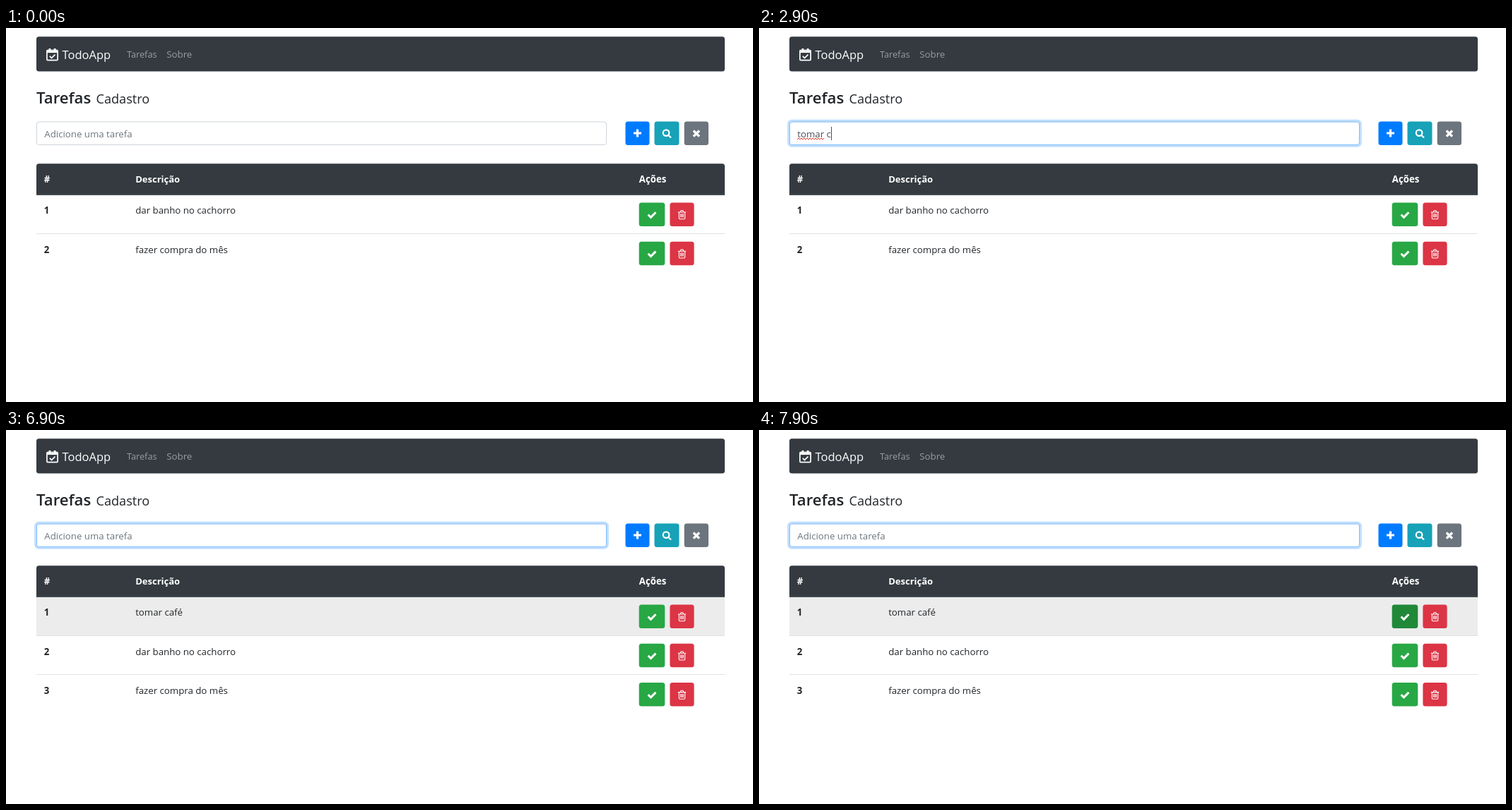
Write an HTML page that moves like this. It is 1057 px wide and 530 px high and loops after 8 s.

```html
<!DOCTYPE html>
<html lang="pt">
<head>
<meta charset="utf-8">
<title>Tarefas</title>
<style>
  html, body { margin: 0; width: 100%; height: 100%; overflow: hidden; background: #fff; }
  svg { display: block; width: 1057px; height: 530px; font: 13.25px "Open Sans", sans-serif; fill: #212529; }
  .bold { font-weight: 700; }
  .white { fill: #fff; }
  .muted { fill: rgba(255, 255, 255, .5); }
  .line { fill: none; stroke: #fff; }
  #typed { fill: #495057; white-space: pre; }
  .wave { fill: none; stroke: #e3362c; stroke-width: 1; }
</style>
</head>
<body>
<svg viewBox="0 0 1057 530">
  <defs>
    <g id="check"><path class="line" stroke-width="3" d="M-5.4 .2l3.8 3.8 7-7"/></g>
    <g id="trash" class="line" stroke-width="1.1">
      <path d="M-5.6 -3.7h11.2M-2.2 -4l.8-2h2.8l.8 2M-4.2 -3.5v8.3q0 1.2 1.1 1.2h6.2q1.1 0 1.1-1.2v-8.3M-1.9 -1.4v5M0 -1.4v5M1.9 -1.4v5"/>
    </g>
  </defs>

  <rect x="43" y="12.3" width="974" height="49.2" rx="3.5" fill="#343a40"/>
  <g class="line" stroke-width="1.7">
    <rect x="57.9" y="31.6" width="15.2" height="14" rx="1"/>
    <path d="M58 33.8h15" stroke-width="2.6"/>
    <path d="M61.9 29v4.4M69.1 29v4.4" stroke-width="2.8"/>
    <path d="M61.8 39.9l2.7 2.7 5-5"/>
  </g>
  <text class="white" x="79.5" y="44" font-size="16.5">TodoApp</text>
  <text class="muted" x="171" y="42" font-size="12.7">Tarefas</text>
  <text class="muted" x="227.3" y="42">Sobre</text>

  <text x="43" y="107" font-size="22.2" font-weight="600">Tarefas</text>
  <text x="127.5" y="107" font-size="18.1">Cadastro</text>

  <rect id="glow" x="41.6" y="131.1" width="809.8" height="36.3" rx="4.8" fill="none" stroke="#007bff" stroke-opacity=".25" stroke-width="2.8"/>
  <rect x="43.5" y="133" width="806" height="32.5" rx="3" fill="#fff" stroke="#ced4da"/>
  <rect id="edge" x="43.5" y="133" width="806" height="32.5" rx="3" fill="none" stroke="#80bdff"/>
  <text id="hint" x="54.3" y="155" fill="#6c757d">Adicione uma tarefa</text>
  <text id="typed" x="54.3" y="155"></text>
  <path id="wave1" class="wave"/>
  <path id="wave2" class="wave"/>
  <rect id="caret" y="140" width="1" height="19" fill="#495057"/>

  <rect x="876.5" y="132.5" width="34" height="33.4" rx="3.5" fill="#007bff"/>
  <path class="line" stroke-width="3.2" d="M888 149h11M893.5 143.5v11"/>
  <rect x="917.5" y="132.5" width="35" height="33.4" rx="3.5" fill="#17a2b8"/>
  <path class="line" stroke-width="2.2" d="M938.4 148.6a4.3 4.3 0 1 0-8.6 0a4.3 4.3 0 1 0 8.6 0M937.2 151.7l3.8 3.8"/>
  <rect x="959.7" y="132.5" width="34.3" height="33.4" rx="3.5" fill="#6c757d"/>
  <path class="line" stroke-width="3.3" d="M972.8 145.5l8.2 8.2M981 145.5l-8.2 8.2"/>

  <path d="M43 237v-41.3q0-3.5 3.5-3.5h967q3.5 0 3.5 3.5v41.3z" fill="#343a40"/>
  <rect x="43" y="235.5" width="974" height="1.5" fill="#454d55"/>
  <g class="white bold">
    <text x="53.8" y="219.3">#</text>
    <text x="183.2" y="219.3" font-size="13">Descrição</text>
    <text x="895.8" y="219.3">Ações</text>
  </g>
  <g id="rows"></g>
</svg>
<script>
const LOOP = 8000, PITCH = 55.3, LEFT = 54;
const PHRASE = 'tomar café';
const OLD_TASKS = ['dar banho no cachorro', 'fazer compra do mês'];
const NEW_TASKS = [PHRASE, ...OLD_TASKS];
const ADDED = 5400;
const KEYS = [1800, 1900, 2000, 2200, 2400, 2600, 2900, 3100, 3400, 4200];
// Moments at which the caret shows or hides, starting with the focus click.
const CARET = [900, 1400, 1800, 3900, 4200, 4700, 5200, 5900, 6400, 6900, 7400, 7900];

const $ = id => document.getElementById(id);
const show = (el, on) => el.setAttribute('visibility', on ? 'visible' : 'hidden');
const passed = (times, t) => times.filter(x => x <= t).length;

const rows = NEW_TASKS.map((_, i) => {
  const top = 237 + Math.round(PITCH * i - .3), y = 247.5 + PITCH * i;
  const base = Math.round(263.2 + PITCH * i);
  $('rows').insertAdjacentHTML('beforeend', `<g>
    <rect class="hover" x="43" y="${top}" width="974" height="${i ? 55 : 54}" fill="#ececec"/>
    ${i ? `<rect x="43" y="${top - 1}" width="974" height="1" fill="#dee2e6"/>` : ''}
    <text class="bold" x="53.8" y="${base}">${i + 1}</text>
    <text class="task" x="183.2" y="${base}"></text>
    <rect class="done" x="895.7" y="${y}" width="36.6" height="33.4" rx="3.5"/>
    <rect x="939.4" y="${y}" width="34.2" height="33.4" rx="3.5" fill="#dc3545"/>
    <use href="#check" x="914" y="${y + 16.8}"/>
    <use href="#trash" x="956.5" y="${y + 17.2}"/>
  </g>`);
  const g = $('rows').lastElementChild;
  return { g, hover: g.querySelector('.hover'), task: g.querySelector('.task'), done: g.querySelector('.done') };
});

const typed = $('typed');
typed.textContent = PHRASE;
const caretX = [LEFT, ...[...PHRASE].map((_, i) => Math.round(typed.getEndPositionOfChar(i).x))];

function squiggle(from, to) {
  let d = `M${from} 158`;
  for (let x = from + 2, up = true; x <= to; x += 2, up = !up) d += `L${x} ${up ? 156 : 158}`;
  return d;
}
$('wave1').setAttribute('d', squiggle(LEFT, caretX[5]));
$('wave2').setAttribute('d', squiggle(caretX[6], caretX[10]));

function hoveredRow(t) {
  if (t < 6800) return -1;
  return t >= 7100 && t < 7400 ? 1 : 0;
}

function draw(t) {
  const focus = t < 900 ? 0 : t < 1000 ? .4 : t < 1100 ? .85 : 1;
  $('glow').setAttribute('opacity', focus);
  $('edge').setAttribute('opacity', focus);

  const added = t >= ADDED;
  const count = added ? 0 : passed(KEYS, t);
  typed.textContent = PHRASE.slice(0, count);
  show($('hint'), !count);
  show($('wave1'), !added && t >= 2600);
  show($('wave2'), !added && t >= 5100);
  $('caret').setAttribute('x', caretX[count]);
  show($('caret'), passed(CARET, t) % 2);

  const tasks = added ? NEW_TASKS : OLD_TASKS, over = hoveredRow(t);
  rows.forEach((row, i) => {
    row.g.style.display = i < tasks.length ? '' : 'none';
    row.task.textContent = tasks[i] || '';
    show(row.hover, i === over);
    const pressed = i === 0 && t >= 7600;
    row.done.setAttribute('fill', !pressed ? '#28a745' : t < 7700 ? '#25993f' : '#218838');
  });
}

const start = performance.now();
function tick() {
  draw((performance.now() - start) % LOOP);
  requestAnimationFrame(tick);
}
tick();
</script>
</body>
</html>
```
